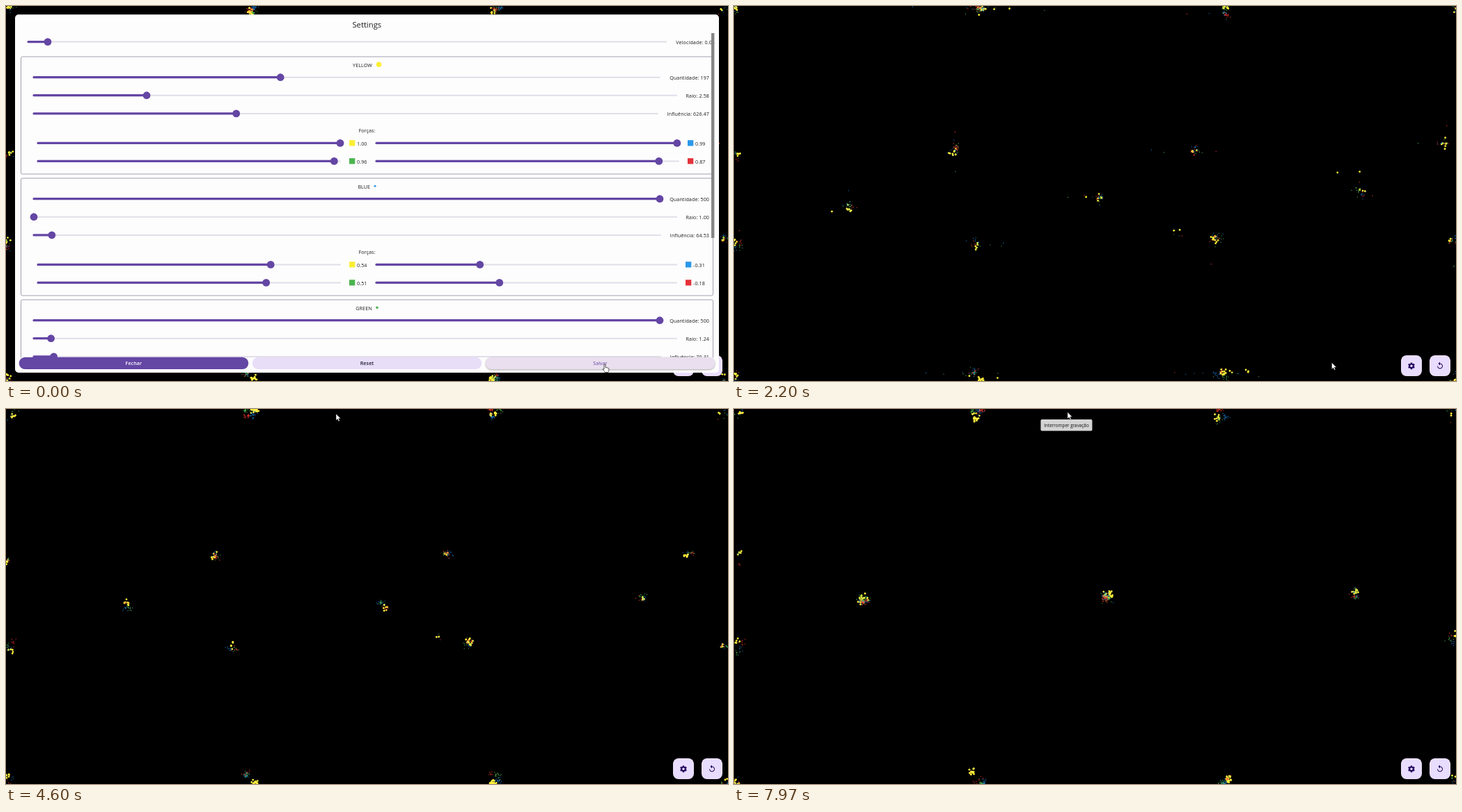
Write an HTML page with a canvas that moves like this. It is 1037 by 540 pixels and loops after 8 s.

```html
<!DOCTYPE html>
<html lang="pt">
<head>
<meta charset="utf-8">
<title>Settings</title>
<style>
  html, body { margin: 0; width: 100%; height: 100%; overflow: hidden; background: #000; }
  canvas, svg { position: absolute; left: 0; top: 0; width: 1037px; height: 540px; }
  text { font-family: "Open Sans", "Noto Sans", sans-serif; font-size: 7.1px; letter-spacing: .12px; fill: #1d1b20; }
  .end { text-anchor: end; }
  .mid { text-anchor: middle; }
  .title { font-size: 11.2px; letter-spacing: .03px; }
  .bold { font-weight: 600; }
  .tip { font-size: 6.35px; letter-spacing: 0; fill: #111; }
</style>
</head>
<body>
<canvas width="1037" height="540"></canvas>
<svg viewBox="0 0 1037 540">
  <defs>
    <clipPath id="view"><rect x="13" y="39" width="1011" height="467.5"/></clipPath>
  </defs>
  <g id="fabs" fill="#22005d">
    <rect x="958" y="503" width="30" height="30" rx="8" fill="#e9ddff"/>
    <rect x="999" y="503" width="30" height="30" rx="8" fill="#e9ddff"/>
    <g id="gear" transform="translate(973 518.3)"></g>
    <path transform="translate(1008 512) scale(.5)" d="M12 5V1L7 6l5 5V7c3.31 0 6 2.69 6 6s-2.69 6-6 6-6-2.69-6-6H4c0 4.42 3.58 8 8 8s8-3.58 8-8-3.58-8-8-8z"/>
  </g>
  <g id="dialog"></g>
  <g id="tooltip">
    <rect x="440.5" y="15" width="74" height="16.5" rx="1.8" fill="#d4d4d4"/>
    <text class="mid tip" x="477.5" y="25.6">Interromper gravação</text>
  </g>
  <path id="hand" fill="#fff" stroke="#111" stroke-width=".7" stroke-linejoin="round"
    d="M0 1.2Q0 0 1 0T2 1.2V4.6Q3.1 4 3.8 4.9Q4.9 4.4 5.4 5.3Q6.6 5 6.8 6.4V8.6Q6.6 10.4 5.8 11.6H1.4Q.6 10 -1.9 7.4Q-2 5.9 0 7.2Z"/>
  <path id="arrow" fill="#fff" stroke="#111" stroke-width=".5"
    d="M0 0V9.4L2.2 7.4L3.7 10.7L5.3 10L3.8 6.8H6.8Z"/>
</svg>
<script>
const W = 1037, H = 540, LOOP = 8000, RESET = 60, FADE = 150;
const $ = id => document.getElementById(id);
const NS = "http://www.w3.org/2000/svg";

function add(parent, tag, attrs, text) {
  const el = document.createElementNS(NS, tag);
  for (const k in attrs) el.setAttribute(k, attrs[k]);
  if (text) el.textContent = text;
  parent.appendChild(el);
  return el;
}

// ---- Settings dialog ----
const PURPLE = "#6446a4";
const TINT = { yellow: "#fbee35", blue: "#2a98ea", green: "#4bb450", red: "#e5323b" };

function slider(g, x0, x1, y, f) {
  const x = x0 + (x1 - x0) * f;
  const line = (a, b, w, stroke) =>
    add(g, "line", { x1: a, x2: b, y1: y, y2: y, stroke, "stroke-width": w, "stroke-linecap": "round" });
  line(x, x1, 2, "#e2dee9");
  line(x0, x, 3.2, PURPLE);
  add(g, "circle", { cx: x, cy: y, r: 5.4, fill: PURPLE });
}

function row(g, y, end, f, label) {
  slider(g, 40, end, y, f);
  add(g, "text", { class: "end", x: 1010, y: y + 3.2 }, label);
}

function force(g, x0, y, value, color) {
  const shift = value < 0 ? 3 : 0;
  slider(g, x0, x0 + 434 - shift, y, (value + 1) / 2);
  const x = x0 + 447 - shift;
  add(g, "rect", { x, y: y - 4.2, width: 8.3, height: 8.3, fill: TINT[color] });
  add(g, "text", { x: x + 11, y: y + 3.2 }, value.toFixed(2));
}

function panel(g, y, p) {
  add(g, "rect", { x: 21.5, y, width: 994, height: 169, rx: 2, fill: "none", stroke: "#8d889b", "stroke-width": .8 });
  add(g, "text", { class: "mid", x: p.nameX, y: y + 14.6 }, p.name);
  add(g, "circle", { cx: p.dotX, cy: y + 11.3, r: p.dot, fill: TINT[p.name.toLowerCase()] });
  row(g, y + 29.7, 939, p.count / 500, "Quantidade: " + p.count);
  row(g, y + 55.7, 963, (p.radius - 1) / 9, "Raio: " + p.radius.toFixed(2));
  row(g, y + 81.9, p.reach > 99 ? 936 : 940, (p.reach - 10) / 1900, "Influência: " + p.reach);
  add(g, "text", { class: "mid", x: 518.5, y: y + 109.3 }, "Forças:");
  Object.keys(TINT).forEach((c, i) =>
    force(g, i % 2 ? 532 : 46, y + (i < 2 ? 124.4 : 150.4), p.forces[i], c));
}

function button(g, x, fill, color, label, cls, style) {
  add(g, "rect", { x, y: 505.7, width: 329.5, height: 17.2, rx: 8.6, fill, style });
  add(g, "text", { class: "mid " + cls, x: x + 164.7, y: 517.3, style: "fill:" + color }, label);
}

function buildDialog() {
  const d = $("dialog");
  add(d, "rect", { x: 13, y: 12.3, width: 1011, height: 515.7, rx: 5, fill: "#fdfdfd" });
  add(d, "text", { class: "mid title", x: 518.3, y: 30.6 }, "Settings");
  const g = add(d, "g", { "clip-path": "url(#view)" });
  slider(g, 32, 948.5, 51.6, .0305);
  add(g, "text", { class: "end", x: 1018, y: 54.8 }, "Velocidade: 0.04");
  panel(g, 73, { name: "YELLOW", nameX: 512, dotX: 535.5, dot: 3.8, count: 197, radius: 2.58, reach: 626.47, forces: [1, .99, .96, .87] });
  panel(g, 248, { name: "BLUE", nameX: 514.3, dotX: 530, dot: 1.5, count: 500, radius: 1, reach: 64.53, forces: [.54, -.31, .51, -.18] });
  panel(g, 423, { name: "GREEN", nameX: 514, dotX: 533, dot: 1.8, count: 500, radius: 1.24, reach: 70.31, forces: [.5, .4, .3, .2] });
  add(g, "rect", { x: 1013, y: 39, width: 4.4, height: 295, fill: "#858585" });
  button(d, 18.7, PURPLE, "#fff", "Fechar", "bold", "");
  button(d, 353.8, "#e8def8", "#1d192b", "Reset", "bold", "");
  button(d, 688.8, "#e9dfee", PURPLE, "Salvar", "", "filter:drop-shadow(0 1px 1px #0005)");
}

function buildGear() {
  const g = $("gear");
  for (let i = 0; i < 6; i++)
    add(g, "rect", { x: -1.3, y: -4.9, width: 2.6, height: 3, rx: .4, transform: `rotate(${i * 60})` });
  add(g, "circle", { r: 3.6 });
  add(g, "circle", { r: 1.7, fill: "#e9ddff" });
}

// ---- Particles ----
let seed = 20;
function rnd() {
  seed = (seed + 0x6d2b79f5) | 0;
  let z = Math.imul(seed ^ (seed >>> 15), 1 | seed);
  z = (z + Math.imul(z ^ (z >>> 7), 61 | z)) ^ z;
  return ((z ^ (z >>> 14)) >>> 0) / 4294967296;
}
const gauss = () => rnd() + rnd() + rnd() + rnd() - 2;

// Pull, then x, y at each key time
const KEYS = [2200, 3100, 4600, 6400, 7900];
const roaming = [
  [1, 318, 207, 306, 208, 298, 209, 186, 270, 186, 275],
  [.9, 168, 290, 170, 284, 173, 283, 186, 270, 186, 275],
  [.9, 525, 276, 538, 282, 542, 282, 537, 272, 536, 271],
  [1, 663, 208, 650, 211, 635, 209, 537, 272, 536, 271],
  [.6, 900, 270, 910, 273, 914, 271, 901, 269, 892, 268],
  [.9, 1020, 201, 1017, 205, 983, 210, 901, 269, 892, 268],
  [1, 347, 342, 336, 342, 325, 344, 186, 270, 186, 275],
  [1.1, 692, 334, 690, 333, 664, 336, 537, 272, 536, 271],
  [.6, 640, 328, 627, 323, 621, 331, 556, 286, 536, 271],
];
// Pull and place
const resting = [
  [.9, 3, 3], [1.5, 351, 5], [1.4, 704, 6], [.8, 1032, 2],
  [.6, 1, 216], [1, 4, 343], [.7, 1036, 335],
  [.9, 4, 534], [1.5, 351, 532], [1.3, 701, 533], [.6, 1034, 535],
];
const kinds = [
  { color: "#ffee3b", r: 1.4, n: 150, lag: 0 },
  { color: "#2196f3", r: .55, n: 180, lag: 480 },
  { color: "#4caf50", r: .62, n: 190, lag: 700 },
  { color: "#f2372f", r: .65, n: 140, lag: 80 },
];

const groups = [...roaming, ...resting].map(([pull, ...path]) => ({
  pull, path,
  rests: path.length === 2,
  sway: kinds.map(() => ({ ax: rnd() * 6.3, ay: rnd() * 6.3, w: .0012 + rnd() * .002 })),
}));

function pathAt(path, t) {
  if (path.length === 2) return path;
  let i = 0;
  while (i < KEYS.length - 2 && t > KEYS[i + 1]) i++;
  const f = Math.min(1, Math.max(0, (t - KEYS[i]) / (KEYS[i + 1] - KEYS[i])));
  const mix = k => path[i * 2 + k] + (path[i * 2 + 2 + k] - path[i * 2 + k]) * f;
  return [mix(0), mix(1)];
}

function settleTime() {
  const u = rnd();
  return 820 + 430 * u + 1500 * u ** 11;
}

function makeParticle(kind) {
  const x = rnd() * W, y = rnd() * H;
  let group, best = Infinity;
  for (const g of groups) {
    const d = Math.hypot(x - g.path[0], y - g.path[1]) / g.pull;
    if (d < best) { best = d; group = g; }
  }
  const [gx, gy] = group.path;
  const wallX = group.rests && (gx < 9 || gx > W - 9);
  const wallY = group.rests && (gy < 9 || gy > H - 9);
  return {
    x, y, kind, group,
    tx: settleTime() * (wallX ? .62 : 1),
    ty: settleTime() * (wallY ? .62 : 1),
    dx: gauss() * 4, dy: gauss() * 4, ph: rnd() * 6.3, w: .002 + rnd() * .003,
  };
}
const particles = kinds.flatMap((k, i) => Array.from({ length: k.n }, () => makeParticle(i)));

const bounce = (v, max) => max - Math.abs(max - Math.abs(v));
const left = (age, tau) => age < 0 ? 0 : Math.exp(-((age / tau) ** 3));

function place(p, t) {
  const [gx, gy] = pathAt(p.group.path, t - (t > 4600 ? Math.min(kinds[p.kind].lag, t - 4600) : 0));
  const s = p.group.sway[p.kind];
  const amp = p.group.rests ? 5 + t / 2200 : 4;
  const x = gx + amp * Math.sin(s.ax + s.w * t) + p.dx * (1 + .5 * Math.sin(p.ph + p.w * t));
  const y = gy + amp * Math.sin(s.ay + s.w * t) + p.dy * (1 + .5 * Math.cos(p.ph + p.w * t));
  const age = t - RESET;
  return [
    bounce(x + (p.x - x) * left(age, p.tx), W),
    bounce(y + (p.y - y) * left(age, p.ty), H),
  ];
}

const ctx = document.querySelector("canvas").getContext("2d");
function drawParticles(t) {
  ctx.fillStyle = "#000";
  ctx.fillRect(0, 0, W, H);
  for (const p of particles) {
    const k = kinds[p.kind], [x, y] = place(p, t);
    ctx.fillStyle = k.color;
    ctx.beginPath();
    ctx.arc(x, y, k.r, 0, 7);
    ctx.fill();
  }
}

// ---- Pointer and timeline ----
const moves = [[0, 858.5, 513.5], [2600, 858.5, 513.5], [3100, 896.5, 358], [3500, 800, 210], [4200, 474, 7], [4700, 474, 7], [5000, 479, 4.5]];
function pointerAt(t) {
  const i = moves.findIndex(m => m[0] > t);
  if (i < 0) return moves[moves.length - 1].slice(1);
  const [t0, x0, y0] = moves[i - 1], [t1, x1, y1] = moves[i];
  const f = (t - t0) / (t1 - t0);
  return [x0 + (x1 - x0) * f, y0 + (y1 - y0) * f];
}

const show = (el, on) => el.setAttribute("visibility", on ? "visible" : "hidden");

function render(t) {
  drawParticles(t);
  const fade = Math.min(1, Math.max(0, 1 - (t - RESET) / FADE));
  $("dialog").setAttribute("opacity", fade);
  show($("dialog"), fade > 0);
  show($("tooltip"), t >= 5200);
  show($("hand"), t < 1800);
  show($("arrow"), t >= 1800);
  $("hand").setAttribute("transform", "translate(859 516)");
  $("arrow").setAttribute("transform", `translate(${pointerAt(t)})`);
}

buildDialog();
buildGear();
const start = performance.now();
function tick() {
  render((performance.now() - start) % LOOP);
  requestAnimationFrame(tick);
}
tick();
</script>
</body>
</html>
```
